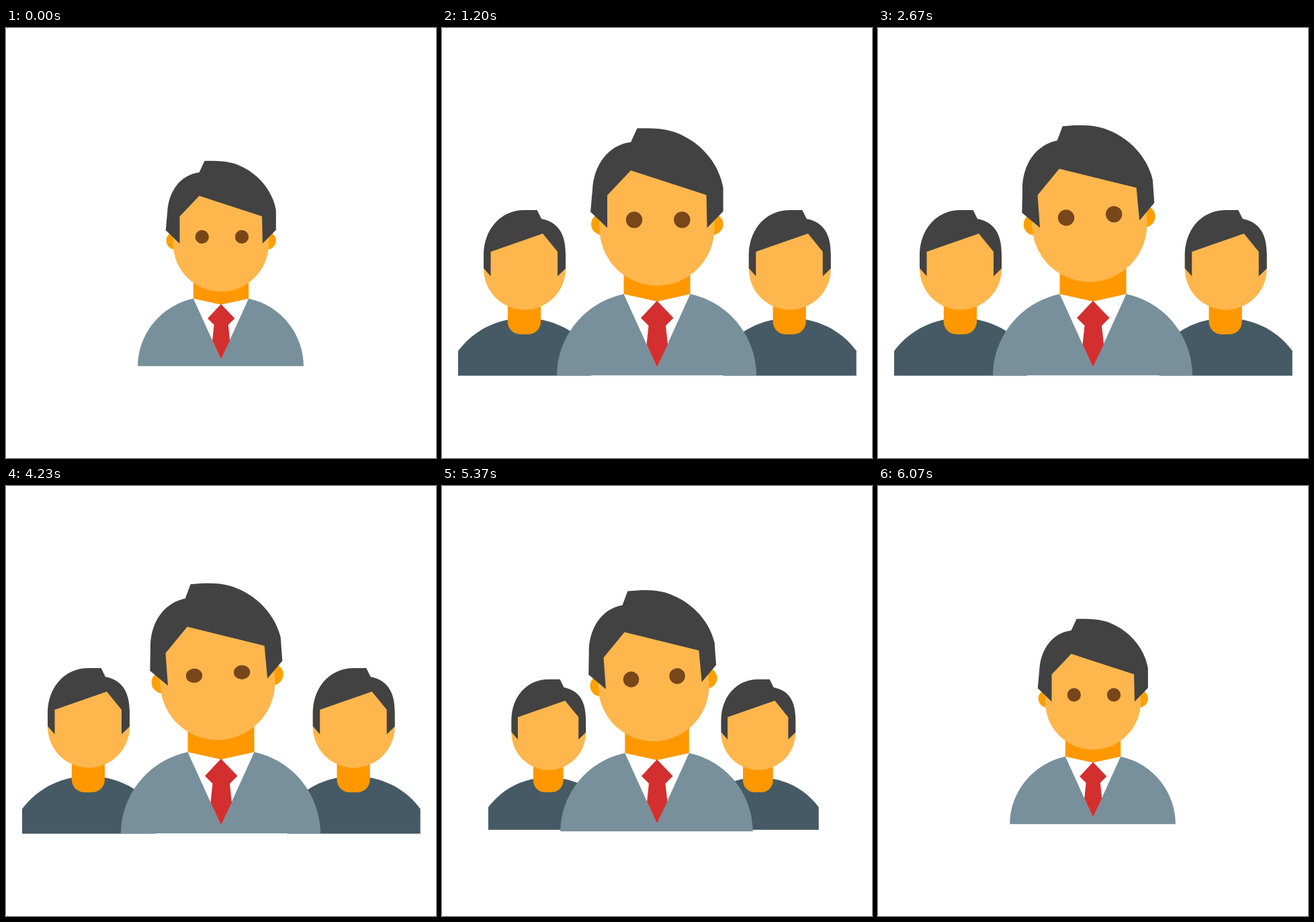
Animation of 640x640 px, one loop 7210 ms. Source, as an HTML page:

```html
<!DOCTYPE html>
<html lang="en">
<head>
<meta charset="utf-8">
<title>Team</title>
<style>
  html, body { margin: 0; width: 100%; height: 100%; overflow: hidden; background: #fff; }
  svg { display: block; width: 100%; height: 100%; }
</style>
</head>
<body>
<svg viewBox="0 0 640 640">
  <defs>
    <g id="member">
      <path fill="#455a64" d="M24 480.5C50 447 85 432 123 432S197 447 222 480.5V517.6H24Z"/>
      <rect fill="#ff9800" x="97.8" y="390" width="49.2" height="66" rx="19"/>
      <path fill="#ffb74d" d="M62 358.5V334L150 300 184 334V358.5A61 61 0 0 1 62 358.5Z"/>
      <path fill="#424242" d="M123 271C86 271 62 301 62 338V357.5L72.5 369.5V333L150 306 172 333V369.5L184 358V338C184 313.5 178 290 148 284L141.5 271Z"/>
    </g>
  </defs>
  <use id="left" href="#member"/>
  <use id="right" href="#member"/>
  <g id="leader">
    <path fill="#ff9800" d="M270.5 340H369.5V397L320 408 270.5 397Z"/>
    <path fill="#fff" d="M270.5 396L320 407 369.5 396 320 505Z"/>
    <path fill="#78909c" d="M270.5 396L320 505 369.5 396C430 409 468 462 468 517H171C171 462 210 409 270.5 396Z"/>
    <path fill="#d32f2f" d="M320 406L344.5 431.5 333 443 336 471 320 505 304.5 471 307.5 443 296 431.5Z"/>
    <g id="head">
      <g fill="#ffa000">
        <circle cx="238" cy="292" r="16"/>
        <circle cx="402.5" cy="292" r="16"/>
      </g>
      <path fill="#ffb74d" d="M234.5 298V249L281 205 405.5 245V298A85.5 85.5 0 0 1 234.5 298Z"/>
      <path fill="#424242" d="M290.5 149.3L281 170C248 174 226 203 224 240L221 273.5 246 297.5V249L281 212 393.5 248.5 394.5 297.5 418.5 273V238C413 205 390 176 360 161 348 154 330 149.3 306 149.3Z"/>
      <g fill="#784719">
        <circle class="eye" cx="286" cy="285.5" r="12.2"/>
        <circle class="eye" cx="357.3" cy="285.5" r="12.2"/>
      </g>
    </g>
  </g>
</svg>
<script>
const LOOP = 7210;
const $ = id => document.getElementById(id);
const eyes = [...document.querySelectorAll('.eye')];
const mix = (a, b, k) => a + (b - a) * k;

// [time, value, power of the ramp that leads here]
const grow = [[0, 0], [1200, 1], [5167, 1], [5370, .21], [5870, .88 * -1 + 1], [6070, 0]];
grow[3][1] = 1 - .21;
const tilt = [[1540, 0], [2670, 1, 2.3], [5400, 1], [5870, 0]];
const lids = [[4200, 1], [4400, .1], [4600, 1]];

function at(track, t) {
  if (t <= track[0][0]) return track[0][1];
  for (let i = 1; i < track.length; i++) {
    const [t0, v0] = track[i - 1], [t1, v1, power = 1] = track[i];
    if (t < t1) return mix(v0, v1, ((t - t0) / (t1 - t0)) ** power);
  }
  return track[track.length - 1][1];
}

// Members scale from the middle of their bottom edge.
function placeMember(el, x, p) {
  const y = mix(489.5, 517.5, p), s = mix(.563, 1, p);
  el.setAttribute('transform', `translate(${x} ${y}) scale(${s}) translate(-123 -517.5)`);
  el.style.display = p > .02 ? '' : 'none';
}

function draw(t) {
  const p = at(grow, t), lid = at(lids, t);
  placeMember($('left'), mix(292, 123, p), p);
  placeMember($('right'), mix(t < 3000 ? 349 : 296, 517.7, p), p);
  $('leader').setAttribute('transform',
    `translate(320 435.5) scale(${mix(.8306, 1, p)}) translate(-320 -435.5)`);
  $('head').setAttribute('transform', `rotate(${-4.15 * at(tilt, t)} 240 366)`);
  for (const eye of eyes)
    eye.setAttribute('transform', `translate(0 ${285.5 * (1 - lid)}) scale(1 ${lid})`);
}

const start = performance.now();
function tick() {
  draw((performance.now() - start) % LOOP);
  requestAnimationFrame(tick);
}
tick();
</script>
</body>
</html>
```
